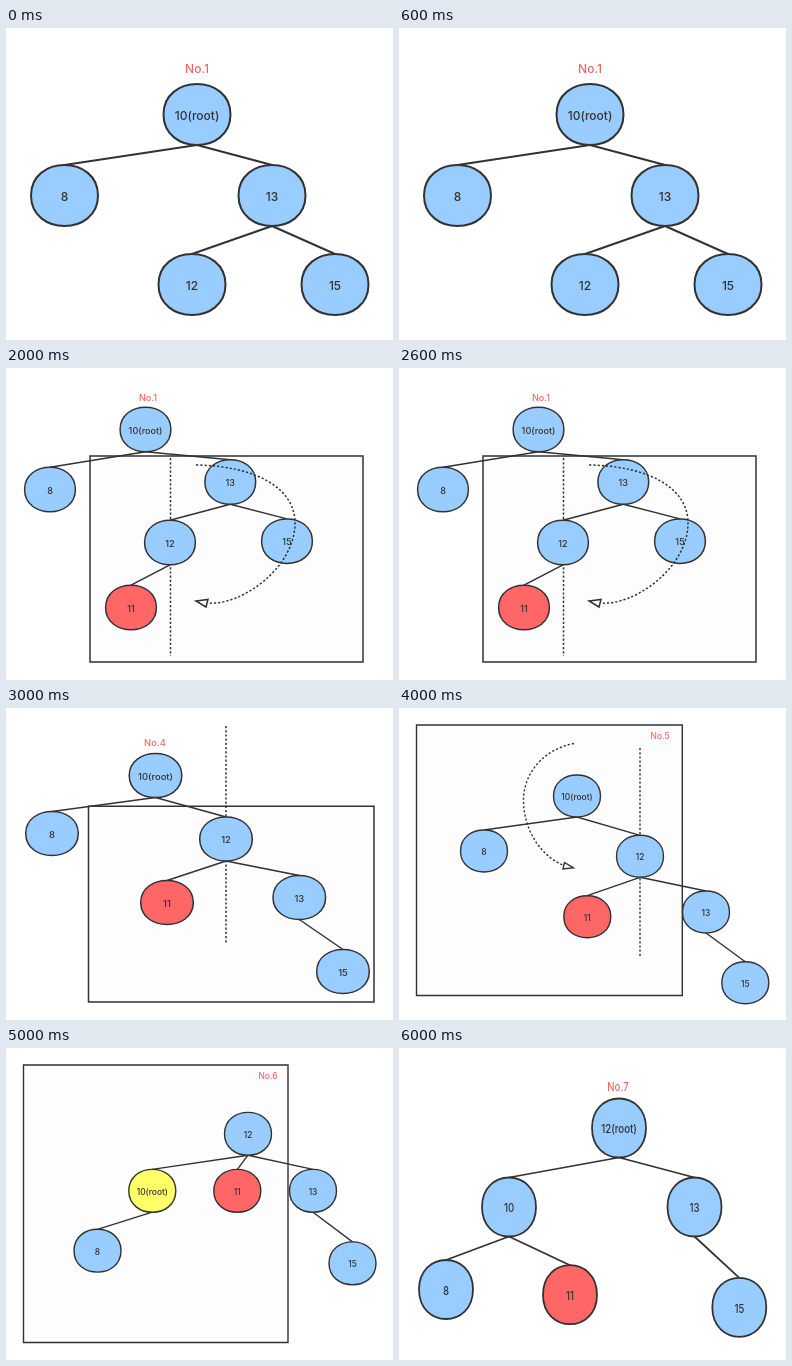
Write an HTML page that moves like this. It is 387 px wide and 312 px high and loops after 7 s.

```html
<!DOCTYPE html>
<html lang="en">
<head>
<meta charset="utf-8">
<title>Balancing a search tree</title>
<style>
  html, body { margin: 0; width: 100%; height: 100%; overflow: hidden; background: #fff; }
  svg { display: block; width: 387px; height: 312px; }
  text { font: 500 12px Inter, Roboto, sans-serif; text-anchor: middle; }
</style>
</head>
<body>
<svg id="stage" viewBox="0 0 387 312"></svg>
<script>
const INK = '#323232', BLUE = '#99ccff', RED = '#ff6666', YELLOW = '#ffff66';
const LABEL = '#ee6a60';
const STEP = 1000;

// Nodes: [text, x, y, parent index, fill]; size: node radii
const scenes = [
  {
    label: ['No.1', 191, 40.5], size: [33.5, 30.5],
    nodes: [['10(root)', 191, 86.5], ['8', 58.5, 167.5, 0], ['13', 266, 167.5, 0],
      ['12', 186, 256.5, 2], ['15', 329, 256.5, 2]]
  },
  {
    label: ['No.2', 191, 32], size: [33.5, 24.5],
    nodes: [['10(root)', 191, 69], ['8', 58.5, 133.2, 0], ['13', 266, 133.2, 0],
      ['12', 186, 204, 2], ['15', 329, 204, 2], ['11', 119, 267.8, 3, RED]]
  },
  {
    label: ['No.1', 142, 29.5], size: [25.4, 22.3],
    box: [84, 88, 357, 294], axis: [164.5, 90, 288],
    arc: 'M190 97C250 98 289 120 289 155C289 200 235 238 202 235',
    head: 'M190 233L202 231.5L200 239Z',
    nodes: [['10(root)', 139.5, 61.5], ['8', 44, 121.5, 0], ['13', 224.3, 114, 0],
      ['12', 164, 174.5, 2], ['15', 281, 173.2, 2], ['11', 125, 239.5, 3, RED]]
  },
  {
    label: ['No.4', 149, 34.5], size: [26.3, 22],
    box: [82.5, 98.3, 368, 294], axis: [220, 18, 236],
    nodes: [['10(root)', 149.5, 67.6], ['8', 46, 125.5, 0], ['12', 220, 131, 0],
      ['11', 161, 194.5, 2, RED], ['13', 293.3, 189.5, 2], ['15', 337, 263.5, 4]]
  },
  {
    label: ['No.5', 261, 28], size: [23.5, 21],
    box: [17.5, 17, 283.3, 287.5], axis: [241, 40, 248],
    arc: 'M175 35.5C145 41 124.5 65 124.5 92C124.5 125 145 150 165 157.5',
    head: 'M174.5 159.8L165.5 154.5L164 161Z',
    nodes: [['10(root)', 178, 88], ['8', 85, 143, 0], ['12', 241, 148.3, 0],
      ['11', 188.3, 208.7, 2, RED], ['13', 307, 204, 2], ['15', 346.3, 274.8, 4]]
  },
  {
    label: ['No.6', 262, 28], size: [23.5, 21.4],
    box: [17.5, 17, 282, 294.5],
    nodes: [['12', 242, 85.8], ['10(root)', 146.3, 142.8, 0, YELLOW], ['11', 231.3, 142.8, 0, RED],
      ['13', 307, 142.8, 0], ['8', 91.5, 202.7, 1], ['15', 346.5, 215.3, 3]]
  },
  {
    label: ['No.7', 219, 39], size: [27, 29.5],
    nodes: [['12(root)', 220, 80], ['10', 110, 159, 0], ['13', 295.5, 159, 0],
      ['8', 47, 241.5, 1], ['11', 171, 246.7, 1, RED], ['15', 340.3, 259.3, 2]]
  }
];

const path = (d, fill = 'none', extra = '') => `<path d="${d}" fill="${fill}" ${extra}/>`;

function blob(x, y, rx, ry, fill) {
  const h = ry * 4 / 3, l = x - rx, r = x + rx;
  return path(`M${l} ${y}C${l} ${y - h} ${r} ${y - h} ${r} ${y}C${r} ${y + h} ${l} ${y + h} ${l} ${y}Z`, fill);
}

function render({ label, size: [rx, ry], box, axis, arc, head, nodes }) {
  // The whole drawing is zoomed per scene, so text follows the node size
  const sx = rx / 33.5, sy = ry / 30.5;
  const dots = 'stroke-dasharray="2.2 2"';
  const write = (s, x, y, fill, drop = 0) =>
    `<text transform="translate(${x} ${y}) scale(${sx} ${sy})" y="${4.4 + drop}" fill="${fill}" stroke="none">${s}</text>`;

  let out = '';
  if (box) out += path(`M${box[0]} ${box[1]}H${box[2]}V${box[3]}H${box[0]}Z`, '#fdfdfd');
  if (axis) out += path(`M${axis[0]} ${axis[1]}V${axis[2]}`, 'none', dots);
  for (const [, x, y, up] of nodes) {
    if (up === undefined) continue;
    const [, px, py] = nodes[up];
    out += path(`M${px} ${py + ry}L${x} ${y - ry}`);
  }
  for (const [s, x, y, , fill = BLUE] of nodes) {
    out += blob(x, y, rx, ry, fill) + write(s, x, y, INK, 1.2);
  }
  if (arc) out += path(arc, 'none', dots) + path(head, '#fff');
  out += write(...label, LABEL);
  return `<g stroke="${INK}" stroke-width="${sx + sy}">${out}</g>`;
}

const stage = document.getElementById('stage');
let shown = -1;

function show(t) {
  const i = Math.floor(t / STEP) % scenes.length;
  if (i === shown) return;
  shown = i;
  stage.innerHTML = render(scenes[i]);
}

let start;
function tick(now) {
  start ??= now;
  show(Math.max(0, now - start));
  requestAnimationFrame(tick);
}
show(0);
requestAnimationFrame(tick);
</script>
</body>
</html>
```
